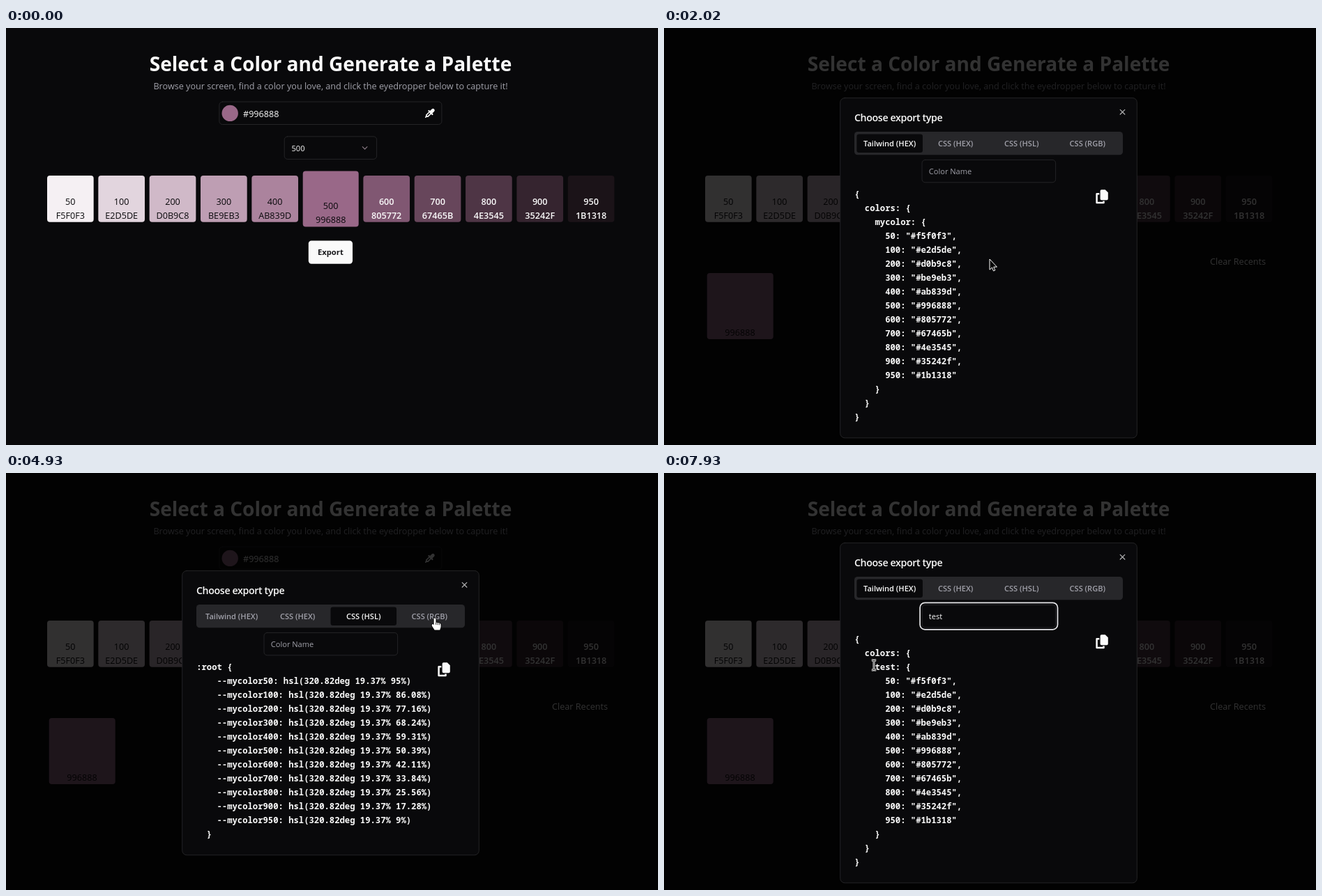
Recreate the animation shown at these times as an HTML page with a canvas. Size 935 by 599 pixels, loop 8 s.

```html
<!DOCTYPE html>
<html lang="en">
<head>
<meta charset="utf-8">
<title>Palette export</title>
<style>
  html, body { margin: 0; width: 100%; height: 100%; overflow: hidden; background: #09090b; }
  canvas { display: block; width: 935px; height: 599px; }
</style>
</head>
<body>
<canvas id="stage"></canvas>
<script>
const W = 935, H = 599, LOOP = 8000;
const BG = '#09090b', LINE = '#27272a', TEXT = '#fafafa', MUTED = '#a1a1aa';
const SANS = '"Open Sans", "Noto Sans", sans-serif';
const MONO = '"Noto Sans Mono", "DejaVu Sans Mono", monospace';
const BODY = 12.64, SMALL = 11.06, CHAR = 7.333;

const SHADES = [50, 100, 200, 300, 400, 500, 600, 700, 800, 900, 950];
const COLORS = ['f5f0f3', 'e2d5de', 'd0b9c8', 'be9eb3', 'ab839d', '996888',
  '805772', '67465b', '4e3545', '35242f', '1b1318'];
const TABS = ['Tailwind (HEX)', 'CSS (HEX)', 'CSS (HSL)', 'CSS (RGB)'];

const OPEN_AT = 1940, FOCUS_AT = 6370;
const TAB_TIMES = [[3580, 1], [4460, 2], [5250, 3], [5890, 0]];
const TYPE_TIMES = [6910, 6985, 7060, 7220];
const CLICKS = [[1710, 1940], [3500, 3660], [4380, 4540], [5170, 5330], [5810, 5970], [6370, 6520]];

// start, end, steps, then a quadratic curve: from, control, to
const MOVES = [
  [840, 1630, 11, 576, 562, 520, 420, 467, 332],
  [2640, 3190, 8, 466, 332, 410, 270, 388, 170],
  [3580, 3740, 3, 388, 170, 410, 169, 433, 169],
  [3820, 4230, 6, 433, 169, 465, 178, 508, 206],
  [4460, 4930, 7, 508, 206, 560, 203, 615, 208],
  [5330, 5730, 6, 615, 208, 480, 202, 333, 206],
  [6050, 6290, 4, 333, 206, 390, 208, 448, 205],
  [7450, 7930, 7, 448, 205, 390, 155, 301, 276]
];

const ARROW = new Path2D('M0 0V15.2L3.4 12L5.5 17L7.8 16L5.7 11.2H10.4Z');
const HAND = new Path2D('M-1.4 1.4Q0 -.8 1.4 1.4V6.4L6.6 7.4Q8.6 8 8.6 10V13.2L7.2 17.4H-.4' +
  'L-4 12Q-5 10 -3.6 9.2Q-2.6 8.8 -1.4 10.4Z');
const KNUCKLES = new Path2D('M1.6 6.6V10M4 7.2V10.2M6.4 7.8V10.4');
const BEAM = new Path2D('M-3.2 -7H-1L0 -6.3L1 -7H3.2M0 -6.3V6.3M-3.2 7H-1L0 6.3L1 7H3.2');

const canvas = document.getElementById('stage');
const ctx = canvas.getContext('2d');
const ratio = window.devicePixelRatio || 1;
canvas.width = W * ratio;
canvas.height = H * ratio;

function text(str, x, y, size, color, weight = 400, align = 'left', family = SANS) {
  ctx.font = `${weight} ${size}px ${family}`;
  ctx.textAlign = align;
  ctx.fillStyle = color;
  ctx.fillText(str, x, y);
}

function box(x, y, w, h, r, fill, stroke, width = 0.9) {
  ctx.beginPath();
  ctx.roundRect(x, y, w, h, r);
  if (fill) { ctx.fillStyle = fill; ctx.fill(); }
  if (stroke) { ctx.strokeStyle = stroke; ctx.lineWidth = width; ctx.stroke(); }
}

function disc(x, y, r, color) {
  ctx.beginPath();
  ctx.arc(x, y, r, 0, Math.PI * 2);
  ctx.fillStyle = color;
  ctx.fill();
}

function line(points, width, color, cap = 'butt') {
  ctx.beginPath();
  points.forEach(([x, y]) => ctx.lineTo(x, y));
  ctx.lineWidth = width;
  ctx.lineCap = cap;
  ctx.lineJoin = 'round';
  ctx.strokeStyle = color;
  ctx.stroke();
}

function activeTab(t) {
  return TAB_TIMES.reduce((tab, [at, next]) => t >= at ? next : tab, 0);
}

function codeLines(tab, name) {
  if (tab === 0) {
    const rows = SHADES.map((s, i) => `      ${s}: "#${COLORS[i]}"${i < 10 ? ',' : ''}`);
    return ['{', '  colors: {', `    ${name}: {`, ...rows, '    }', '  }', '}'];
  }
  const value = [null, i => '#' + COLORS[i], hsl, rgb][tab];
  return [':root {', ...SHADES.map((s, i) => `    --${name}${s}: ${value(i)}`), '  }'];
}

function hsl(i) {
  const mid = 50.392;
  const light = i < 5 ? 95 + (mid - 95) * i / 5 : mid + (9 - mid) * (i - 5) / 5;
  return `hsl(320.82deg 19.37% ${+light.toFixed(2)}%)`;
}

function rgb(i) {
  const parts = COLORS[i].match(/../g).map(h => parseInt(h, 16));
  return `rgb(${parts.join(' ')})`;
}

function drawDropper() {
  line([[609.7, 120.8], [612.3, 118.2]], 4.8, TEXT, 'round');
  line([[606.4, 119], [611.4, 124]], 2.2, TEXT, 'round');
  line([[606.8, 121], [602.8, 125], [602.8, 127.2], [605, 127.2], [609.2, 123.2]], 1.7, TEXT);
  line([[602.8, 127.2], [601.8, 128.2]], 1.7, TEXT, 'round');
}

function drawSwatches() {
  let x = 59;
  SHADES.forEach((shade, i) => {
    const big = shade === 500;
    const size = big ? 80 : 66.67;
    const y = 245.4 - size / 2;
    const color = i > 5 ? TEXT : BG;
    const weight = i > 5 ? 600 : 400;
    box(x, y, size, size, 4, '#' + COLORS[i]);
    text(shade, x + size / 2, y + size - 25, BODY, color, weight, 'center');
    text(COLORS[i].toUpperCase(), x + size / 2, y + size - 5, BODY, color, weight, 'center');
    x += size + 6.67;
  });
}

function drawPage(hover, recents) {
  ctx.fillStyle = BG;
  ctx.fillRect(0, 0, W, H);
  text('Select a Color and Generate a Palette', 465.5, 61.5, 28.1, TEXT, 700, 'center');
  text('Browse your screen, find a color you love, and click the eyedropper below to capture it!',
    465.5, 87.5, BODY, MUTED, 400, 'center');

  box(305.9, 106, 319, 32.5, 4.5, null, LINE);
  disc(321.2, 122.4, 11.7, '#996888');
  text('#996888', 340, 128, BODY, TEXT);
  drawDropper();

  box(399.2, 155.9, 132.4, 32.5, 4.5, null, LINE);
  text('500', 409.5, 176.5, SMALL, TEXT);
  line([[511.3, 170.7], [514.6, 174], [517.9, 170.7]], 1.2, '#857680', 'round');

  drawSwatches();
  box(433.8, 305.4, 63.2, 33.3, 4.2, hover ? '#e2e2e2' : TEXT);
  text('Export', 465.4, 326.3, 11.2, '#18181b', 700, 'center');

  if (recents) {
    text('Clear Recents', 863, 340.3, BODY, TEXT, 400, 'right');
    box(61.7, 352, 95, 95, 4, '#996888');
    text('996888', 109, 441.7, BODY, BG, 400, 'center');
  }
}

function drawCopy(x, y) {
  ctx.save();
  ctx.translate(x, y);
  line([[5, 6], [1.3, 6], [1.3, 18.7], [11.2, 18.7], [11.2, 16.2]], 2.5, TEXT);
  ctx.beginPath();
  ctx.moveTo(8, 0);
  ctx.lineTo(13.4, 0);
  ctx.lineTo(17.5, 4.1);
  ctx.arcTo(17.5, 15, 15, 15, 1.9);
  ctx.arcTo(6.3, 15, 6.3, 10, 1.9);
  ctx.arcTo(6.3, 0, 10, 0, 1.9);
  ctx.closePath();
  ctx.fillStyle = TEXT;
  ctx.fill();
  ctx.restore();
}

function drawDialog(t, tab, top, lines, typed) {
  box(252.7, top + 0.4, 425.6, 599.2 - 2 * top + (top === 100 ? 89.3 : 89.3 - 0.4), 6.5, BG, LINE);
}

function dialogFrame(top, count) {
  const height = 149 + count * 20;
  box(252.7, top + 0.4, 425.6, height - 0.6, 6.5, BG, LINE);
}

function drawModal(t, tab, top, lines, typed) {
  dialogFrame(top, lines.length);
  ctx.letterSpacing = '-0.37px';
  text('Choose export type', 273, top + 33.8, 14.2, TEXT, 600);
  ctx.letterSpacing = '0px';
  line([[654.2, top + 17.4], [660.8, top + 24]], 1.2, '#b3b3b4', 'round');
  line([[660.8, top + 17.4], [654.2, top + 24]], 1.2, '#b3b3b4', 'round');

  box(273, top + 49, 385, 33.3, 4.6, LINE);
  TABS.forEach((label, i) => {
    const x = 276.4 + i * 94.55;
    const on = i === tab;
    if (on) box(x, top + 52.4, 94.55, 26.6, 3.3, BG);
    text(label, x + 47.2, top + 69.8, SMALL, on ? TEXT : MUTED, 600, 'center');
  });

  if (t >= FOCUS_AT) box(367.1, top + 86.4, 197.4, 38.4, 7, null, '#e4e4e7', 1.7);
  box(370, top + 89.4, 191.6, 32.4, 4.5, null, LINE);
  text(typed || 'Color Name', 379.8, top + 110.4, SMALL, typed ? TEXT : MUTED);

  drawCopy(619.3, top + 132.2);
  lines.forEach((row, i) => {
    const indent = row.search(/\S/);
    text(row.trim(), 273.2 + indent * CHAR, top + 143 + i * 20, CHAR / 0.6, TEXT, 600, 'left', MONO);
  });
}

function pointerAt(t) {
  const move = MOVES.filter(m => t >= m[0]).pop();
  if (!move) return null;
  const [from, to, steps, x0, y0, cx, cy, x1, y1] = move;
  const step = Math.floor((t - from) / (to - from) * (steps - 1) + 0.02);
  const p = Math.min(1, (step + 1) / steps);
  const u = p * p * (3 - 2 * p), v = 1 - u;
  return {
    x: v * v * x0 + 2 * u * v * cx + u * u * x1,
    y: v * v * y0 + 2 * u * v * cy + u * u * y1
  };
}

function inside(p, x, y, w, h) {
  return p.x >= x && p.x <= x + w && p.y >= y && p.y <= y + h;
}

function pointerKind(p, open, top, lines) {
  if (!open) return inside(p, 434, 305, 63, 33) ? 'hand' : 'arrow';
  if (inside(p, 273, top + 49, 385, 33)) return 'hand';
  if (inside(p, 369, top + 89, 193, 33)) return 'beam';
  const row = lines[Math.floor((p.y - top - 129) / 20)];
  if (!row) return 'arrow';
  const left = 273 + row.search(/\S/) * CHAR - 3;
  return p.x >= left && p.x <= 273 + row.length * CHAR ? 'beam' : 'arrow';
}

function drawPointer(p, kind) {
  ctx.save();
  ctx.translate(p.x, p.y);
  ctx.lineCap = 'butt';
  ctx.lineJoin = 'round';
  if (kind === 'beam') {
    ctx.strokeStyle = '#fff';
    ctx.lineWidth = 2.8;
    ctx.stroke(BEAM);
    ctx.strokeStyle = '#000';
    ctx.lineWidth = 0.9;
    ctx.stroke(BEAM);
  } else if (kind === 'hand') {
    ctx.strokeStyle = '#000';
    ctx.lineWidth = 1.6;
    ctx.stroke(HAND);
    ctx.fillStyle = '#fff';
    ctx.fill(HAND);
    ctx.lineWidth = 0.8;
    ctx.stroke(KNUCKLES);
  } else {
    ctx.fillStyle = '#000';
    ctx.fill(ARROW);
    ctx.strokeStyle = '#fff';
    ctx.lineWidth = 1;
    ctx.stroke(ARROW);
  }
  ctx.restore();
}

function draw(t) {
  ctx.setTransform(ratio, 0, 0, ratio, 0, 0);
  const open = t >= OPEN_AT;
  const tab = activeTab(t);
  const top = tab === 0 ? 100 : 140;
  const typed = 'test'.slice(0, TYPE_TIMES.filter(at => t >= at).length);
  const lines = codeLines(tab, typed || 'mycolor');
  const pointer = pointerAt(t);
  const kind = pointer && pointerKind(pointer, open, top, lines);

  drawPage(!open && kind === 'hand', open);
  if (open) {
    const shown = t < OPEN_AT + 80 ? 0.6 : 1;
    const scale = 0.95 + 0.05 * shown;
    ctx.fillStyle = `rgba(0, 0, 0, ${0.8 * shown})`;
    ctx.fillRect(0, 0, W, H);
    ctx.save();
    ctx.globalAlpha = shown;
    ctx.translate(465.5, 344.5);
    ctx.scale(scale, scale);
    ctx.translate(-465.5, -344.5);
    drawModal(t, tab, top, lines, typed);
    ctx.restore();
  }
  if (!pointer) return;
  if (CLICKS.some(([from, to]) => t >= from && t < to)) {
    disc(pointer.x, pointer.y, 10, 'rgba(250, 238, 50, 0.72)');
  }
  drawPointer(pointer, kind);
}

const start = performance.now();
function tick() {
  draw((performance.now() - start) % LOOP);
  requestAnimationFrame(tick);
}
tick();
</script>
</body>
</html>
```
